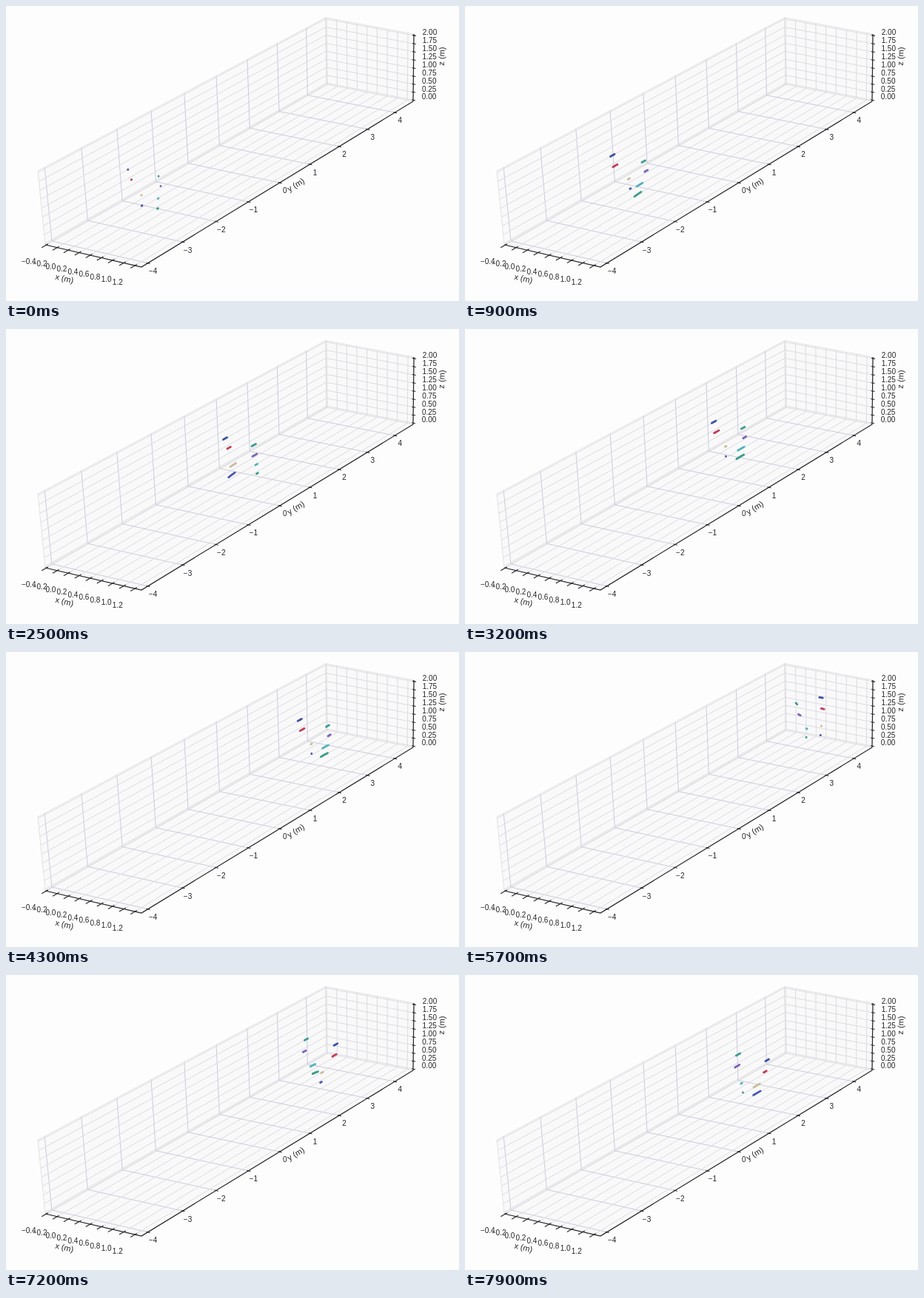
Recreate the animation shown at these times as an HTML page. Size 612x399 px, loop 8 s.

```html
<!DOCTYPE html>
<html>
<head>
<meta charset="utf-8">
<style>
html, body { margin: 0; width: 100%; height: 100%; overflow: hidden; background: #fdfdfd; }
svg { display: block; }
text { font: 10px "Liberation Sans", Arial, sans-serif; fill: #242428; text-anchor: middle; }
text.title { font-size: 11px; }
</style>
</head>
<body>
<svg id="stage" width="612" height="399" viewBox="0 0 612 399" fill="none"></svg>
<script>
const stage = document.getElementById('stage');

function add(tag, attrs, text) {
  const el = document.createElementNS('http://www.w3.org/2000/svg', tag);
  for (const key in attrs) el.setAttribute(key, attrs[key]);
  if (text) el.textContent = text;
  return stage.appendChild(el);
}

// Perspective view of the unit box: screen corners with their depth weights.
const ORIGIN = [53, 323, 1], X = [183, 353, .985], Y = [433, 106, 1.158], Z = [43, 223, .978];
function project(u, v, w) {
  const depth = 1 + u * (X[2] - 1) + v * (Y[2] - 1) + w * (Z[2] - 1);
  return [0, 1].map(i => (ORIGIN[i] + u * (X[i] * X[2] - ORIGIN[i])
    + v * (Y[i] * Y[2] - ORIGIN[i]) + w * (Z[i] * Z[2] - ORIGIN[i])) / depth);
}

const toPath = pts => 'M' + pts.map(p => p.map(n => n.toFixed(2)).join(' ')).join('L');
const poly = (...corners) => toPath(corners.map(c => project(...c)));
const line = (d, stroke, width) => add('path', { d, stroke, 'stroke-width': width });
const label = (x, y, text) => add('text', { x, y: y + 3.6 }, text);
const number = (n, digits) => n.toFixed(digits).replace('-', '\u2212');

// Box units per metre, and the box coordinate of each metre value.
const PER_X = .5775, PER_Y = .1128, PER_Z = .48;
const atX = x => .241 + PER_X * x;
const atY = y => .4715 + PER_Y * y;
const atZ = z => .02 + PER_Z * z;

const AXIS = '#242428', MINOR = '#dcdce2', MAJOR = '#cdcad9';
const panes = [
  poly([0, 0, 0], [0, 1, 0], [0, 1, 1], [0, 0, 1]),
  poly([0, 1, 0], [1, 1, 0], [1, 1, 1], [0, 1, 1]),
  poly([0, 0, 0], [1, 0, 0], [1, 1, 0], [0, 1, 0])
];
for (const d of panes) add('path', { d: d + 'Z', fill: '#f9f9fa', stroke: '#e2e2e4' });

const ticks = [...Array(9).keys()].map(k => ({ x: (k - 2) / 5, y: k - 4, z: k / 4 }));
for (const k of ticks) {
  const x = atX(k.x), y = atY(k.y), z = atZ(k.z);
  line(poly([x, 0, 0], [x, 1, 0], [x, 1, 1]), MINOR, 1);
  line(poly([0, 0, z], [0, 1, z], [1, 1, z]), MINOR, 1);
  line(poly([0, y, 1], [0, y, 0], [1, y, 0]), MAJOR, 1);
}
line(poly([0, 0, 0], [1, 0, 0], [1, 1, 0], [1, 1, 1]), AXIS, 1.2);

function tick([x, y], dx, dy, from, to) {
  line(toPath([[x + dx * from, y + dy * from], [x + dx * to, y + dy * to]]), AXIS, 1.1);
}
for (const k of ticks) {
  const px = project(atX(k.x), 0, 0), py = project(1, atY(k.y), 0), pz = project(1, 1, atZ(k.z));
  tick(px, -.87, .5, -3, 7);
  tick(py, .97, .22, -2, 3);
  tick(pz, .97, .2, -2, 3);
  label(px[0] - 23.5, px[1] + 22, number(k.x, 1));
  label(py[0] + 7, py[1] + 10.8, number(k.y, 0));
  label(pz[0] + 21.5, pz[1] - 4.5, number(k.z, 2));
}
const title = (x, y, angle, text) =>
  add('text', { class: 'title', y: 3.8, transform: `translate(${x} ${y}) rotate(${angle})` }, text);
title(79, 368.5, 13, 'x (m)');
title(391.5, 241.8, -31.4, 'y (m)');
title(588.5, 68, -87.5, 'z (m)');

// Joints in metres: half width, height, forward lean, swing and foot lift.
const elbow = { side: .28, height: 1.14, lean: -.06, swing: -.02, lift: 0 };
const wrist = { side: .27, height: .82, lean: 0, swing: -.06, lift: 0 };
const knee = { side: .15, height: .37, lean: .08, swing: .17, lift: .03 };
const ankle = { side: .14, height: .08, lean: .06, swing: .24, lift: .08 };
const LEFT = -1, RIGHT = 1;
const markers = [
  [elbow, LEFT, '#3d50a8'], [wrist, LEFT, '#c43a55'], [knee, LEFT, '#c8be98'], [ankle, LEFT, '#4a55b4'],
  [elbow, RIGHT, '#3c9c90'], [wrist, RIGHT, '#7862bc'], [knee, RIGHT, '#52b2ba'], [ankle, RIGHT, '#3a9c8c']
].map(([joint, hand, stroke]) => ({
  joint, hand,
  el: add('path', { stroke, 'stroke-width': 2.8, 'stroke-linecap': 'round' })
}));

// The walker sets off, slows down, turns around and comes back; t in seconds.
const SPEED = 1.4, SETTLE = .4, TURN_TIME = 5.8, TURN_SPAN = .85, STRIDE = 1.1;
function walker(t) {
  const q = (t - TURN_TIME) / TURN_SPAN, setOff = Math.exp(-t / SETTLE);
  const turn = (1 + Math.tanh((t - 5.55) / .6)) / 2;
  return {
    x: .2,
    y: 5.34 - SPEED * (TURN_SPAN * Math.log(2 * Math.cosh(q)) - SETTLE * setOff),
    heading: Math.PI * turn,
    effort: Math.abs(Math.tanh(q)) * (1 - setOff),
    phase: 2 * Math.PI * ((t - 3.75) / STRIDE - .77 * turn)
  };
}

function position({ joint, hand }, t) {
  const body = walker(t);
  const phase = body.phase + (hand === RIGHT ? Math.PI : 0);
  const ahead = joint.lean + joint.swing * body.effort * Math.sin(phase);
  const aside = hand * joint.side;
  const height = joint.height + joint.lift * body.effort * Math.max(0, Math.cos(phase));
  const sin = Math.sin(body.heading), cos = Math.cos(body.heading);
  return project(
    atX(body.x + aside * cos + ahead * sin),
    atY(body.y - aside * sin + ahead * cos),
    atZ(height));
}

const start = performance.now();
function draw(now) {
  const t = Math.floor(Math.max(0, now - start) % 8000 / 100) / 10;
  for (const m of markers) {
    const trail = [-.045, 0, .045].map(d => position(m, Math.max(0, t + d)));
    m.el.setAttribute('d', toPath(trail));
  }
  requestAnimationFrame(draw);
}
draw(start);
</script>
</body>
</html>
```
